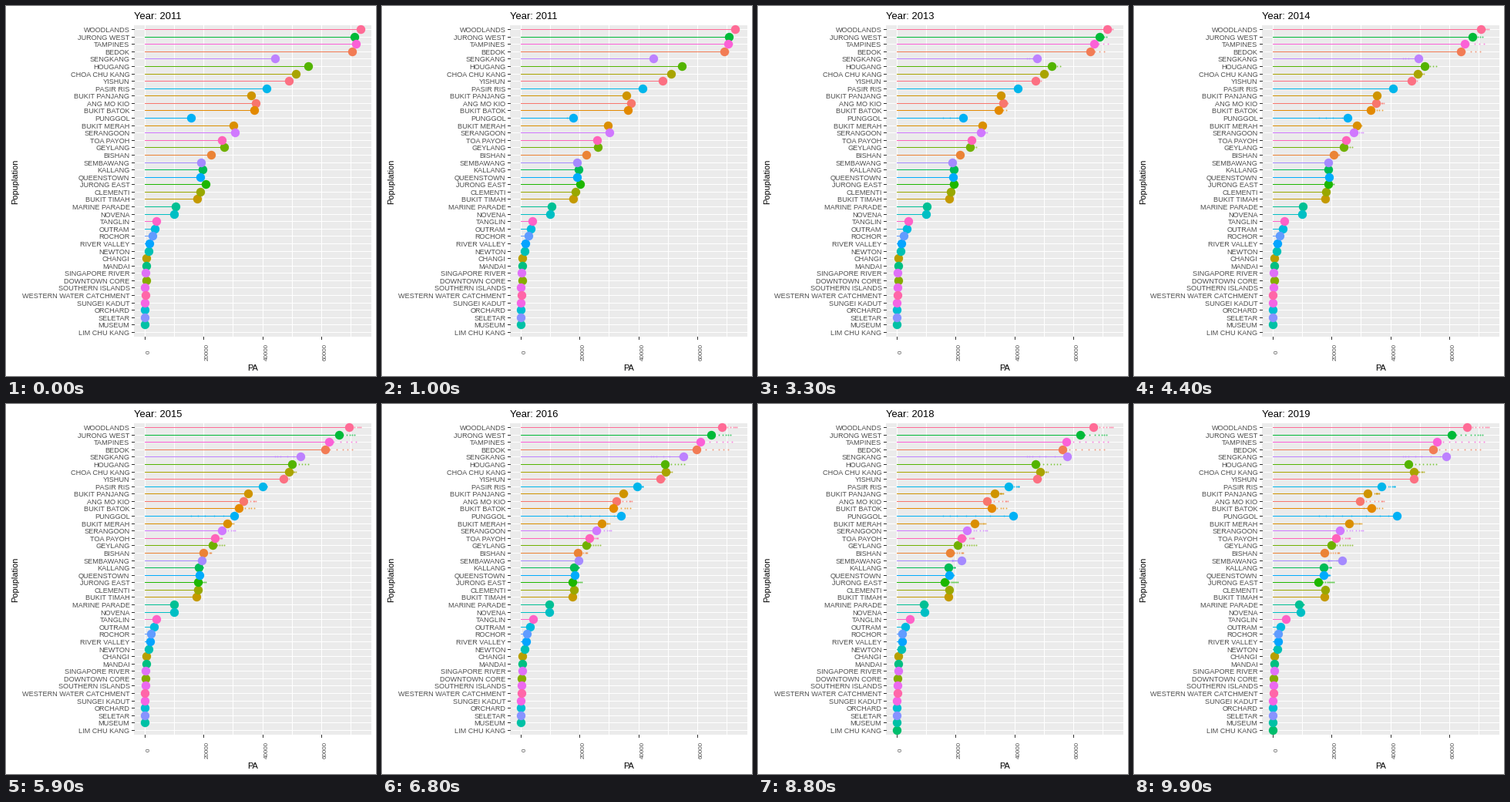
Recreate the animation shown at these times as a matplotlib script. Size 480 by 480 pixels, loop 10 s.

```python
import numpy as np
import matplotlib.pyplot as plt
from matplotlib.animation import FuncAnimation
from matplotlib.collections import LineCollection
from matplotlib.patches import Rectangle

SIZE, FRAMES, FIRST, LAST = 480, 100, 2011, 2019
LEFT, RIGHT, TOP, BOTTOM = 166, 474, 25, 429
ZERO, PX_PER_K = 180, 3.815
ROW0, ROW_STEP = 30, 9.585
GREY = "#4D4D4D"

# Population in thousands at evenly spaced moments from FIRST to LAST.
AREAS = {
    "WOODLANDS": (73.4, 72.3, 70.2, 67.9, 66.0),
    "JURONG WEST": (71.3, 69.8, 67.3, 64.0, 60.8),
    "TAMPINES": (71.8, 68.7, 64.2, 60.0, 55.8),
    "BEDOK": (70.5, 67.4, 62.9, 58.7, 54.5),
    "SENGKANG": (44.3, 46.1, 50.7, 56.8, 59.0),
    "HOUGANG": (55.6, 53.6, 51.0, 48.5, 46.1),
    "CHOA CHU KANG": (51.4, 50.5, 48.9, 49.5, 48.0),
    "YISHUN": (49.0, 47.0, 47.2, 47.4, 48.0),
    "PASIR RIS": (41.4, 41.4, 40.6, 39.3, 37.0),
    "BUKIT PANJANG": (36.2, 35.4, 35.4, 34.6, 32.2),
    "ANG MO KIO": (37.7, 37.0, 34.6, 31.7, 29.6),
    "BUKIT BATOK": (37.2, 35.4, 32.8, 30.9, 33.5),
    "PUNGGOL": (15.7, 20.5, 26.8, 36.5, 42.2),
    "BUKIT MERAH": (30.1, 28.4, 25.9),
    "SERANGOON": (30.7, 29.4, 27.0, 25.2, 22.8),
    "TOA PAYOH": (26.2, 25.7, 24.6, 22.8, 21.5),
    "GEYLANG": (27.0, 23.8, 19.9),
    "BISHAN": (22.5, 22.0, 20.4, 18.9, 17.6),
    "SEMBAWANG": (19.1, 18.9, 18.9, 19.9, 23.6),
    "KALLANG": (19.7, 19.7, 18.7, 17.8, 17.3),
    "QUEENSTOWN": (18.9, 19.4, 18.9, 18.2, 17.3),
    "JURONG EAST": (20.7, 18.6, 15.5),
    "CLEMENTI": (18.9, 18.1, 17.8),
    "BUKIT TIMAH": (17.8, 17.6),
    "MARINE PARADE": (10.5, 10.1, 8.9),
    "NOVENA": (10.0, 10.0, 9.4),
    "TANGLIN": (3.9, 3.9, 4.5),
    "OUTRAM": (3.5, 3.4, 2.6),
    "ROCHOR": (2.6, 1.8),
    "RIVER VALLEY": (1.5, 1.9),
    "NEWTON": (1.3, 1.5),
    "CHANGI": (0.6, 0.4),
    "MANDAI": (0.5,),
    "SINGAPORE RIVER": (0.2, 0.5),
    "DOWNTOWN CORE": (0.5, 0.3),
    "SOUTHERN ISLANDS": (0.1, 0.3),
    "WESTERN WATER CATCHMENT": (0.3, 0.1, 0.2),
    "SUNGEI KADUT": (0.05,),
    "ORCHARD": (0.05,),
    "SELETAR": (0.05,),
    "MUSEUM": (0.05,),
    "LIM CHU KANG": (0.02,),
}
STARTS = {"LIM CHU KANG": 2017}


def hcl(hue, c=100, l=65):
    """Polar LUV colour to clipped sRGB."""
    h = np.radians(hue)
    y = ((l + 16) / 116) ** 3
    u = c * np.cos(h) / (13 * l) + 0.1978
    v = c * np.sin(h) / (13 * l) + 0.4683
    x = 9 * y * u / (4 * v)
    z = -x / 3 - 5 * y + 3 * y / v
    rgb = np.array([
        3.240479 * x - 1.537150 * y - 0.498535 * z,
        -0.969256 * x + 1.875992 * y + 0.041556 * z,
        0.055648 * x - 0.204043 * y + 1.057311 * z,
    ])
    rgb = np.clip(rgb, 0, 1)
    return np.where(rgb > 0.00304, 1.055 * rgb ** (1 / 2.4) - 0.055, 12.92 * rgb)


def pixel(v):
    return np.floor(np.asarray(v) + 0.5)


def to_x(k):
    return pixel(ZERO + PX_PER_K * np.asarray(k))


names = list(AREAS)
rows = dict(zip(names, pixel(ROW0 + ROW_STEP * np.arange(len(names)))))
order = sorted(names)
colors = [hcl(15 + 360 * i / len(order)) for i in range(len(order))]
ys = np.array([rows[n] for n in order])

years = np.arange(FIRST, LAST + 1)
keys = np.round((FRAMES - 1) * (years - FIRST) / (LAST - FIRST))


def yearly(knots):
    return np.interp(years, np.linspace(FIRST, LAST, len(knots)), knots)


values = np.array([yearly(AREAS[n]) for n in order])
starts = np.array([keys[STARTS.get(n, FIRST) - FIRST] for n in order])

plt.rcParams["font.family"] = "Liberation Sans"
fig = plt.figure(figsize=(SIZE / 72, SIZE / 72), dpi=72, facecolor="white")
ax = fig.add_axes([0, 0, 1, 1])
ax.set(xlim=(0, SIZE), ylim=(SIZE, 0))
ax.axis("off")


def lines(segments, color, z):
    # Whole coordinates: the renderer snaps them to the pixel's centre.
    lc = LineCollection(segments, colors=color, linewidths=1,
                        antialiaseds=False, capstyle="butt", zorder=z)
    ax.add_collection(lc, autolim=False)
    return lc


def label(x, y, s, size, color="black", ha="left", rotation=0):
    return ax.text(x, y, s, fontsize=size, color=color, ha=ha, va="baseline",
                   rotation=rotation, rotation_mode="anchor")


ax.add_patch(Rectangle((LEFT, TOP), RIGHT - LEFT, BOTTOM - TOP,
                       fc="#EBEBEB", lw=0, antialiased=False, zorder=0))
ticks = np.arange(0, 80, 20)
lines([[(x, TOP), (x, BOTTOM)] for x in to_x(np.arange(0, 80, 10))], "white", 1)
lines([[(LEFT, y), (RIGHT, y)] for y in ys], "white", 1)
lines([[(LEFT - 3, y), (LEFT, y)] for y in ys]
      + [[(x, BOTTOM), (x, BOTTOM + 3)] for x in to_x(ticks)], "#333333", 1)

for name, y in rows.items():
    label(160.5, y + 4, name, 9.1, GREY, "right")
for k in ticks:
    label(to_x(k) + 6.6, 449, str(k * 1000), 8, GREY, "center", 90)
label(320, 473, "PA", 11, ha="center")
label(15, 228, "Popuplation", 11, ha="center", rotation=90)
title = label(LEFT, 17, "", 13)

stems = lines([], colors, 2)
marks = ax.scatter([], [], s=4, lw=0, alpha=0.7, zorder=3)
dots = ax.scatter(np.zeros(len(order)), ys, s=11.4 ** 2, c=colors, lw=0, zorder=4)


def draw(i):
    year = FIRST + (LAST - FIRST) * i // (FRAMES - 1)
    title.set_text(f"Year: {year}")

    now = np.array([np.interp(i, keys, v) for v in values])
    xs = np.where(i >= starts, to_x(now), -50)
    dots.set_offsets(np.column_stack([xs, ys]) + 0.5)
    stems.set_segments([[(ZERO, y), (max(x, ZERO), y)] for x, y in zip(xs, ys)])

    # Small marks stay behind at every year already passed.
    trail = [(x + 0.5, y + 0.5, c)
             for y, c, v, s in zip(ys, colors, values, starts)
             for x, k in zip(to_x(v), keys) if s <= k < i]
    marks.set_offsets([(x, y) for x, y, _ in trail] or np.empty((0, 2)))
    marks.set_facecolor([c for *_, c in trail] or "none")
    return title, stems, marks, dots


anim = FuncAnimation(fig, draw, frames=FRAMES, interval=100,
                     repeat=True, repeat_delay=0, blit=False)
plt.show()
```
